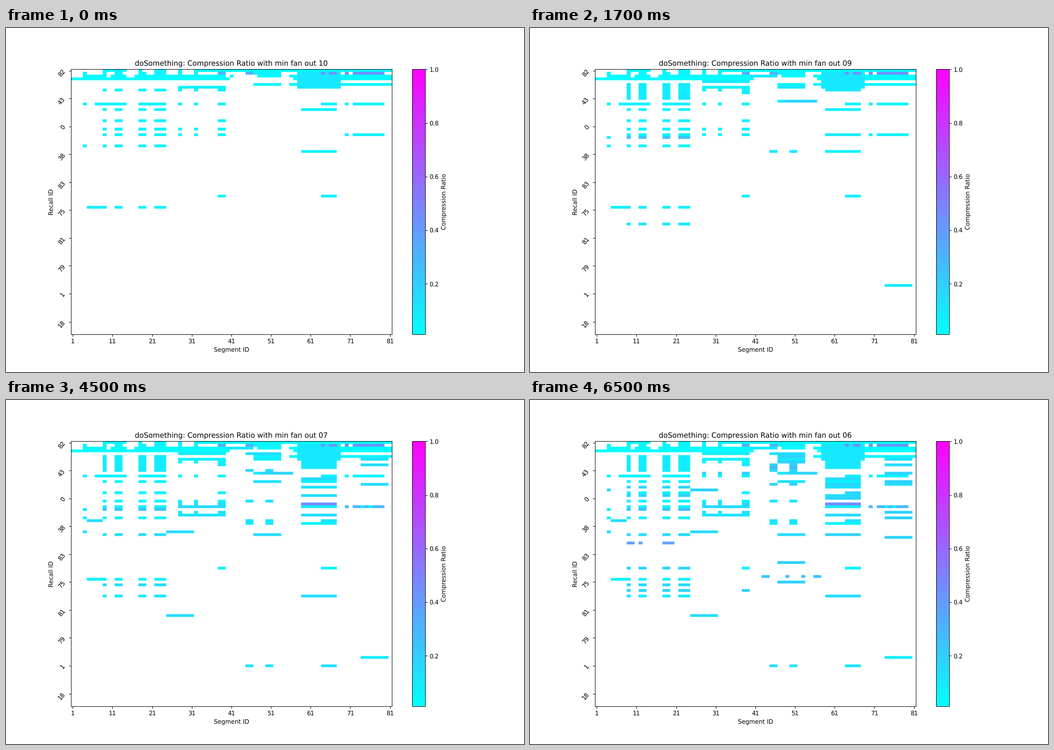
These frames come from a looping animation (917x611 px, 8000 ms). A matplotlib script:

```python
import numpy as np
import matplotlib.pyplot as plt
from matplotlib.animation import FuncAnimation
from matplotlib.cm import ScalarMappable
from matplotlib.colors import Normalize

WIDTH, HEIGHT = 917, 611
DPI = WIDTH / 12
SEGMENTS, RECALLS = 81, 95
FAN_OUTS = range(10, 5, -1)
SMOOTH = 10  # subcells per cell, so that cell edges are antialiased

plt.rcParams.update({"font.family": "DejaVu Sans", "text.hinting": "none"})
grids = np.full((len(FAN_OUTS), RECALLS, SEGMENTS), np.nan)


def paint(step, rows, columns, ratio=None):
    """Fill cells from a step onward; later recalls compress less well."""
    ratio = 0.06 + 0.03 * step if ratio is None else ratio
    grids[step:, np.reshape(rows, (-1, 1)), columns] = ratio


def spread(columns, *rows_by_step):
    for step, rows in enumerate(rows_by_step):
        if rows:
            paint(step, rows, columns)


# Groups of segments that are recalled together
LEFT = np.r_[8, 11:13, 17:19, 21:24]
POINTS = np.r_[27, 31, 37:39]
MIDDLE = np.r_[44:46, 49:51]
BRIDGE = np.r_[46:53]
BLOCK = np.r_[58:67]
TAIL = np.r_[69, 71:79]

spread(LEFT, [1, 7, 14, 18, 21, 23, 27, 49], [5, 6, 8, 9, 10, 24, 55],
       [], [33, 51], [16, 19, 45, 53])
spread(POINTS, [1, 7, 12, 21, 23], [], [25], [22], [11])
spread(np.r_[37:39], [18, 45], [8], [], [], [53])
spread(MIDDLE, [], [29], [4, 21, 28, 80], [10], [8, 15])
spread(BRIDGE, [1, 5], [6, 11], [14], [4, 33], [5, 7, 43, 50])
spread(BLOCK, [14, 29], [23], [16], [13, 19, 26, 55], [15, 20, 33])
spread(np.r_[63:67], [12, 45], [], [28, 80], [], [18])
spread(np.r_[73:80], [], [77], [6], [8, 15], [11, 14, 25, 27, 34])
spread(np.r_[24:31], [], [], [], [32, 62], [17])
spread(np.r_[27:39], [6], [4], [26], [23])
spread(np.r_[4:8], [49], [], [], [28])
spread(TAIL, [12, 23])
spread(np.r_[3], [1, 27], [24], [], [32], [17])
paint(0, 12, np.r_[3, 6:14, 17:24])

# The busiest recalls, and the funnel of segments below them
paint(0, 0, np.r_[8:14, 17, 21:24, 27, 31:81], 0.02)
paint(0, 2, np.r_[3:9, 10:14, 16:39, 40, 47:53, 55:81], 0.03)
paint(0, 3, np.r_[0:40, 56:81], 0.01)
paint(0, 5, np.r_[55:81], 0.05)
paint(1, 2, np.r_[39:46], 0.10)
for row in range(1, 10):
    step = max(0, row - 6)
    paint(step, row, np.r_[57 + row // 7:68 - row // 7], 0.10)

# Recalls with a high ratio
paint(0, 1, np.r_[37:39, 44:46], 0.32)
paint(0, 1, np.r_[63, 65:67, TAIL], 0.44)
paint(1, [9, 11], np.r_[48:56], 0.18)
grids[:, 9, 48:56] = np.nan
paint(1, 24, LEFT, 0.25)
paint(3, 22, BLOCK, 0.46)
paint(3, 23, np.r_[69, 71:73, 74, 76:79], 0.29)
paint(4, 9, MIDDLE, 0.30)
paint(4, 36, np.r_[8:10, 11, 17:20], 0.39)
paint(4, 48, np.r_[42:44, 48, 52, 55:57], 0.24)

cmap = plt.get_cmap("cool").with_extremes(bad="white")
mappable = ScalarMappable(Normalize(1 / SEGMENTS, 1), cmap)


def colours(step):
    cells = mappable.to_rgba(np.ma.masked_invalid(grids[step]), bytes=True)
    return cells.repeat(SMOOTH, axis=0).repeat(SMOOTH, axis=1)


fig, ax = plt.subplots(figsize=(WIDTH / DPI, HEIGHT / DPI), dpi=DPI)
image = ax.imshow(colours(0), aspect="auto", interpolation="antialiased",
                  extent=(-0.5, SEGMENTS - 0.5, RECALLS - 0.5, -0.5))
fig.colorbar(mappable, ax=ax, label="Compression Ratio")
title = ax.set_title("")
ax.set_xlabel("Segment ID")
ax.set_ylabel("Recall ID")
ax.set_xticks(range(0, SEGMENTS, 10), range(1, SEGMENTS + 1, 10))
ax.set_yticks(range(0, RECALLS, 10), [82, 43, 0, 38, 83, 75, 81, 79, 1, 18],
              rotation=50)


def update(frame):
    step = (frame + 3) // 4
    image.set_data(colours(step))
    title.set_text("doSomething: Compression Ratio with min fan out "
                   f"{FAN_OUTS[step]:02d}")
    return image, title


animation = FuncAnimation(fig, update, frames=16, interval=500, repeat=True)
plt.show()
```
